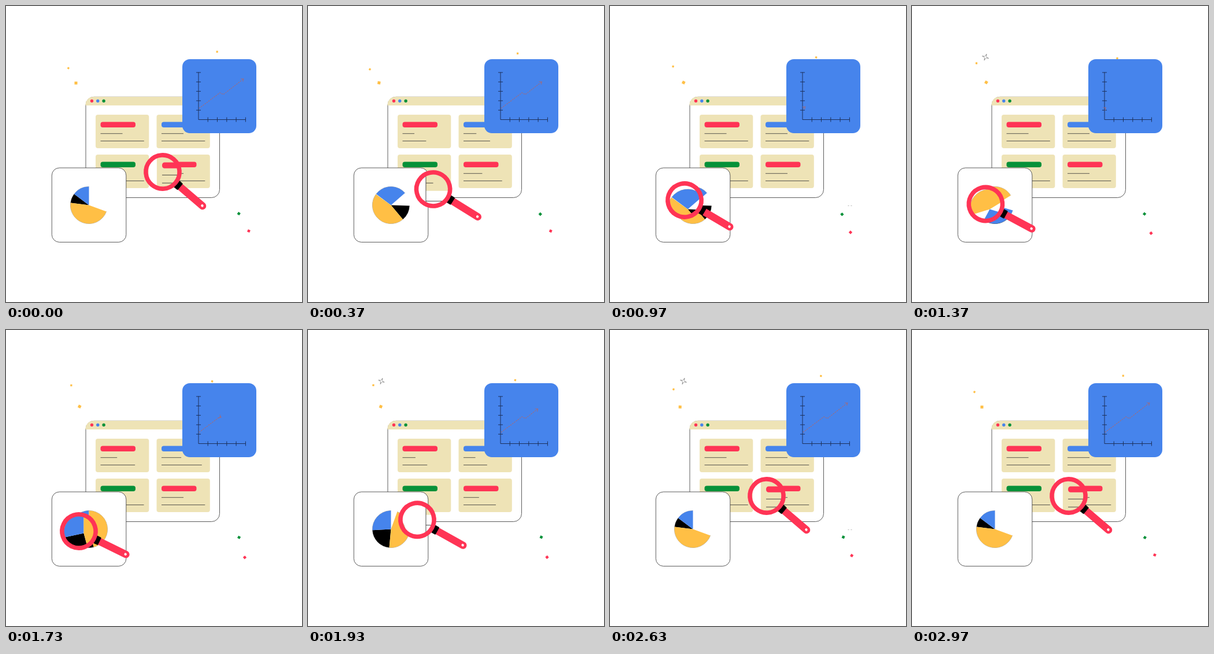
These frames come from a looping animation (512 px wide and 512 px high, 3000 ms). An HTML page with a canvas:

```html
<!DOCTYPE html>
<html lang="en">
<head>
<meta charset="utf-8">
<title>Data analysis</title>
<style>
html, body { margin: 0; width: 100%; height: 100%; overflow: hidden; background: #fff; }
canvas { display: block; }
</style>
</head>
<body>
<canvas id="stage" width="512" height="512"></canvas>
<script>
const ctx = document.getElementById('stage').getContext('2d');
const LOOP = 3000;
const RED = '#ff3455', BLUE = '#4684ec', GREEN = '#059139', YELLOW = '#ffbf45', SAND = '#eee3b6', INK = '#333';

// Sine ease from 0 to 1 between two times
const ease = (t, from, to) => {
  const u = Math.min(1, Math.max(0, (t - from) / (to - from)));
  return (1 - Math.cos(Math.PI * u)) / 2;
};
// Smooth bump from 0 to 1 and back
const hill = (t, from, to) => Math.sin(Math.PI * ease(t, from, to)) ** 2;
// Cosine wave that peaks at a given time
const wave = (t, peak, period) => Math.cos(2 * Math.PI * (t - peak) / period);
const radians = degrees => degrees * Math.PI / 180;

function box(x, y, w, h, r, fill, stroke) {
  ctx.beginPath();
  ctx.roundRect(x, y, w, h, r);
  if (fill) { ctx.fillStyle = fill; ctx.fill(); }
  if (stroke) { ctx.strokeStyle = stroke; ctx.lineWidth = 0.8; ctx.stroke(); }
}

function dot(x, y, r, fill) {
  ctx.beginPath();
  ctx.arc(x, y, r, 0, 7);
  ctx.fillStyle = fill;
  ctx.fill();
}

function line(points, color = INK, width = 0.8) {
  ctx.beginPath();
  points.forEach(p => ctx.lineTo(...p));
  ctx.strokeStyle = color;
  ctx.lineWidth = width;
  ctx.stroke();
}

function at(x, y, degrees, draw) {
  ctx.save();
  ctx.translate(x, y);
  ctx.rotate(radians(degrees));
  draw();
  ctx.restore();
}

function browser(t) {
  box(138, 157.3, 231.5, 174.2, 14, '#fff', INK);
  box(137.6, 157, 232, 15, [14, 14, 0, 0], SAND);
  [RED, BLUE, GREEN].forEach((c, i) => dot(148.5 + i * 10.3, 164.3, 2.7, c));
  [RED, BLUE, GREEN, RED].forEach((color, i) => {
    const x = 155 + (i % 2) * 105.5, y = 188 + (i >> 1) * 69;
    box(x, y, 92.3, 58, 4, SAND);
    box(x + 8.5, y + 12.5, 60.5, 9.5, 4, color);
    // Text lines shorten and grow back twice per loop, card after card
    [38, 75.3].forEach((full, row) => {
      const u = (t % 1500 - 80 - 60 * i - 15 * row) / 580;
      const dip = u > 0 && u < 1 ? 0.46 * Math.sin(Math.PI * u) ** 2 : 0;
      const left = x + 8.5, top = y + 32.7 + row * 12.8;
      line([[left, top], [left + full * (1 - dip), top]]);
    });
  });
}

function pie(t) {
  box(79.3, 280, 128.5, 128.5, 13, '#fff', INK);
  const a = ease(t, 0, 350), b = ease(t, 1000, 1730), c = ease(t, 1730, 2450);
  const wedge = (color, from, to) => {
    ctx.beginPath();
    ctx.arc(143.5, 344.5, 32, radians(from - 90), radians(to - 90));
    ctx.strokeStyle = '#555';
    ctx.lineWidth = 0.5;
    ctx.stroke();
    ctx.lineTo(143.5, 344.5);
    ctx.fillStyle = color;
    ctx.fill();
  };
  // Each edge turns by its own share in three moves
  wedge('#000', 277 + 175 * a + 73 * b + 112 * c, 307 + 193 * a + 118 * b + 49 * c);
  wedge(BLUE, 307 + 311 * b + 49 * c, 360 + 49 * a + 311 * b);
  wedge(YELLOW, 110 + 30 * a + 220 * b + 110 * c, 277 + 29 * a + 219 * b + 112 * c);
}

const TREND = [[334, 177], [370, 150], [376, 153], [411, 126]];

function chart(t) {
  box(305, 92, 128, 128, 13, BLUE);
  const axis = '#1c305c', ink = '#9a6d84';
  line([[333, 114.5], [333, 196.5], [414.5, 196.5]], axis, 1);
  for (let i = 0; i < 5; i++) {
    const x = 349.2 + i * 16.3, y = 115 + i * 16.3;
    line([[329, y], [337, y]], axis, 1);
    line([[x, 192.5], [x, 200.5]], axis, 1);
  }
  let left = 96 * (1 - ease(t, 200, 1100) + ease(t, 1300, 2170));
  if (left < 1) return;
  const path = [TREND[0]];
  let angle = 0;
  for (let i = 1; i < TREND.length && left > 0; i++) {
    const [x, y] = TREND[i - 1], dx = TREND[i][0] - x, dy = TREND[i][1] - y;
    const len = Math.hypot(dx, dy), k = Math.min(1, left / len);
    path.push([x + dx * k, y + dy * k]);
    angle = Math.atan2(dy, dx) * 180 / Math.PI;
    left -= len;
  }
  ctx.setLineDash([2.5, 1.5]);
  line(path, ink, 1.2);
  ctx.setLineDash([]);
  at(...path.at(-1), angle, () => line([[-4, -3], [0, 0], [-4, 3]], ink, 1));
}

// Every piece sways along a short straight drift
function confetti(t) {
  const piece = (size, color, x, y, dx, dy, peak, turn) => {
    const s = wave(t, peak, LOOP);
    at(x + dx * s, y + dy * s, turn + 15 * s, () => box(-size / 2, -size / 2, size, size, 0, color));
  };
  piece(3.2, YELLOW, 110, 102.5, -3, 7, 370, 20);
  piece(5, YELLOW, 124.6, 132.7, 3.8, -0.5, 1350, 15);
  piece(3.2, YELLOW, 360.2, 84.7, -5.2, 5.8, 1350, 15);
  piece(4.5, GREEN, 402.6, 359.2, -1.3, 1.2, 800, 35);
  piece(4.5, RED, 416.5, 391.2, -3.6, 2.2, 1650, 38);
}

function sparkles(t) {
  const r = t > 1150 ? 6 * Math.max(0, wave(t, 1350, 625)) : 0;
  for (let i = 0; i < 4; i++) {
    at(127, 88.5, 20 + 90 * i, () => line([[r * 0.25, -r * 0.15], [r, 0], [r * 0.25, r * 0.15]], '#666', 0.6));
  }
  const d = 5 * Math.max(0, wave(t, 2630, 1660) - 0.3);
  for (const side of [-1, 1]) line([[415 + side * d * 0.4, 345.5], [415 + side * d, 345.5]], '#999', 0.7);
}

function magnifier(t) {
  // Travel to the pie and back, hover there, overshoot on the return
  const k = ease(t, 60, 800) - ease(t, 1730, 2170);
  const arc = Math.sin(Math.PI * k);
  const hover = k * wave(t, 970, 1520);
  const over = hill(t, 1960, 2380);
  const x = 271 - 143.5 * k + 1.5 * hover + 5 * over;
  const y = 287 + 55 * k + 8 * arc - 6 * hover - 9 * over;
  const tilt = 40.5 - 12.1 * k - 3.8 * arc + 2.1 * hover + 4.5 * over;

  // The glass shows the scene enlarged about the stage centre
  ctx.save();
  ctx.beginPath();
  ctx.arc(x, y, 29, 0, 7);
  ctx.clip();
  ctx.fillStyle = '#fff';
  ctx.fill();
  ctx.translate(256, 256);
  ctx.scale(1.08, 1.08);
  ctx.translate(-256, -256);
  browser(t);
  pie(t);
  ctx.restore();

  at(x, y, tilt, () => {
    box(38, -6.3, 59, 12.6, [1, 6.3, 6.3, 1], RED);
    box(31, -7.3, 9, 14.6, 1.5, '#000');
    ctx.beginPath();
    ctx.arc(0, 0, 29.1, 0, 7);
    ctx.strokeStyle = RED;
    ctx.lineWidth = 7.6;
    ctx.stroke();
    dot(90, 0, 2.2, '#fff');
  });
}

const start = performance.now();

function frame() {
  const t = (performance.now() - start) % LOOP;
  ctx.fillStyle = '#fff';
  ctx.fillRect(0, 0, 512, 512);
  for (const part of [confetti, sparkles, browser, chart, pie, magnifier]) part(t);
  requestAnimationFrame(frame);
}
frame();
</script>
</body>
</html>
```
